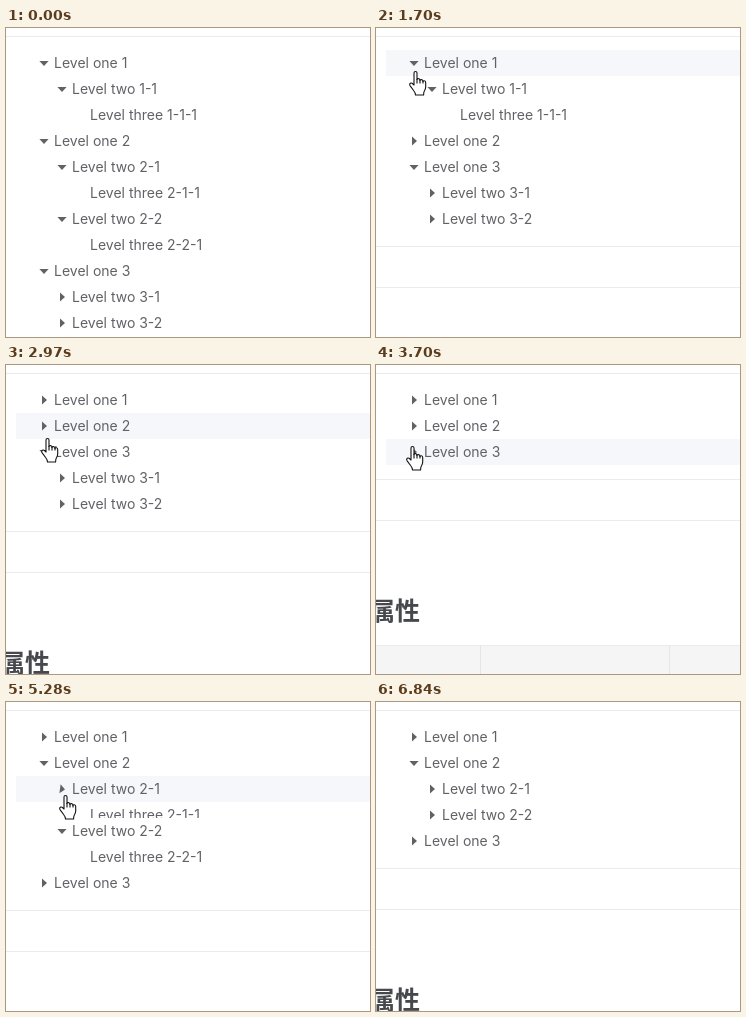
An HTML page for the animation above (7580 ms loop, 364 by 309 pixels).

```html
<!DOCTYPE html>
<html lang="en">
<head>
<meta charset="utf-8">
<title>Collapsible tree</title>
<style>
  html, body { margin: 0; width: 100%; height: 100%; overflow: hidden; background: #fff; }
  #stage { position: relative; width: 364px; height: 309px; overflow: hidden; border: 0; }
  .line { position: absolute; left: 0; width: 364px; height: 1px; background: #ebebeb; }
  #tree { position: absolute; left: 10px; top: 22px; width: 354px;
    font: 14px/26px Inter, sans-serif; color: #606266; white-space: nowrap; }
  .row { position: relative; height: 26px; }
  .row.hover { background: #f5f7fa; }
  .row svg { position: absolute; top: 7px; width: 12px; height: 12px; fill: #606266; }
  .row span { position: absolute; top: 0; }
  .group { overflow: hidden; }
  #below { position: absolute; left: 0; top: 0; width: 364px; height: 300px; }
  h2 { position: absolute; left: -6px; top: 126px; margin: 0; color: #47484d;
    font: bold 25px/36px "Noto Sans CJK SC", "Noto Sans CJK", sans-serif; white-space: nowrap; }
  #table { position: absolute; left: 0; top: 180px; width: 364px; height: 60px;
    background: #f5f5f5; border-top: 1px solid #ebebeb; box-sizing: border-box; }
  #table i { position: absolute; top: 0; width: 1px; height: 60px; background: #e6e6e6; }
  #hand { position: absolute; left: 0; top: 0; width: 18px; height: 25px; overflow: visible; }
</style>
</head>
<body>
<div id="stage">
  <div class="line" style="top:8px"></div>
  <div id="tree"></div>
  <div id="below">
    <div class="line" style="top:14px"></div>
    <div class="line" style="top:55px"></div>
    <h2>属性</h2>
    <div id="table"><i style="left:104px"></i><i style="left:293px"></i></div>
  </div>
  <svg id="hand" viewBox="0 0 18 25" fill="#fff" stroke="#111" stroke-width="1.1" stroke-linejoin="round">
    <path d="M5 2Q5 .5 6.5 .5Q8 .5 8 2V8.5Q8.2 7.5 9.4 7.5Q11 7.6 11 9.5Q11.2 8.5 12.4 8.5Q14 8.6 14 10.5Q14.2 9.6 15.3 9.7Q16.7 9.8 16.7 11.6V16Q16.6 18 15.5 19.7Q14.6 21 14.6 24H6.5Q6.3 21.5 4.6 19.5L1 14.6Q.1 13 1.3 12.2Q2.6 11.5 4 13L5 14Z"/>
    <path d="M8 8V12.5M11 9V12.5M14 10V12.5" fill="none"/>
  </svg>
</div>
<script>
const LOOP = 7580, ROW = 26, TOP = 22, FOLD = 300, LEAD = 120;
const ENTER = 130, LEAVE = 6840;

// toggles: times at which the node starts to close, open, ...
const node = (text, toggles, ...kids) => ({ text, toggles, kids });
const leaf = (text, closed) => ({ text, closed, kids: [] });
const roots = [
  node('Level one 1', [2080],
    node('Level two 1-1', [], leaf('Level three 1-1-1'))),
  node('Level one 2', [1130, 4200],
    node('Level two 2-1', [5154], leaf('Level three 2-1-1')),
    node('Level two 2-2', [5930], leaf('Level three 2-2-1'))),
  node('Level one 3', [3380],
    leaf('Level two 3-1', true), leaf('Level two 3-2', true))
];

// time, x, y of the fingertip
const path = [
  [130, 264, 290], [870, 37, 112], [1350, 37, 112], [1630, 40, 49],
  [1850, 40, 24], [2080, 39, 34], [2570, 39, 35], [2840, 46, 62],
  [3110, 37, 86], [3310, 37, 81], [3750, 37, 81], [4040, 45, 57],
  [4190, 46, 50], [4480, 46, 68], [4600, 46, 68], [4800, 59, 93],
  [5070, 60, 93], [5330, 60, 93], [5550, 59, 100], [5760, 59, 100],
  [5860, 57, 112], [5980, 57, 113], [6840, 305, 309]
];

const $ = id => document.getElementById(id);
const ease = p => { p = Math.min(1, Math.max(0, p)); return p * p * (3 - 2 * p); };

function add(parent, cls) {
  const el = document.createElement('div');
  el.className = cls;
  return parent.appendChild(el);
}

function build(nodes, parent, depth) {
  for (const n of nodes) {
    const x = depth * 18;
    n.row = add(parent, 'row');
    n.row.innerHTML = `<span style="left:${38 + x}px">${n.text}</span>`;
    if (n.toggles || n.closed) {
      n.row.insertAdjacentHTML('beforeend',
        `<svg viewBox="-6 -6 12 12" style="left:${22 + x}px"><path d="M-2-4.6L3 0L-2 4.6Z"/></svg>`);
      n.arrow = n.row.querySelector('path');
    }
    if (n.kids.length) {
      n.group = add(parent, 'group');
      build(n.kids, n.group, depth + 1);
    }
  }
}

// 1 = open, 0 = closed
function openness(toggles, t) {
  return toggles.reduce((v, start, i) => v + (i % 2 ? 1 : -1) * ease((t - start) / FOLD), 1);
}

function measure(nodes, t) {
  let sum = 0;
  for (const n of nodes) {
    n.size = 0;
    if (n.group) {
      n.size = openness(n.toggles, t) * measure(n.kids, t);
      n.group.style.height = n.size + 'px';
    }
    if (n.arrow) {
      const turn = n.closed ? 0 : 90 * openness(n.toggles, t + LEAD);
      n.arrow.setAttribute('transform', `rotate(${turn})`);
    }
    sum += ROW + n.size;
  }
  return sum;
}

function hover(nodes, y, end, tip) {
  for (const n of nodes) {
    n.row.classList.toggle('hover', tip >= y && tip < Math.min(y + ROW, end));
    y += ROW;
    hover(n.kids, y, Math.min(y + n.size, end), tip);
    y += n.size;
  }
}

function pointer(t) {
  let i = 1;
  while (i < path.length - 1 && path[i][0] < t) i++;
  const [t0, x0, y0] = path[i - 1], [t1, x1, y1] = path[i];
  const p = ease((t - t0) / (t1 - t0));
  return [x0 + (x1 - x0) * p, y0 + (y1 - y0) * p];
}

function draw() {
  const t = performance.now() % LOOP;
  const bottom = TOP + measure(roots, t);
  $('below').style.transform = `translateY(${Math.round(bottom)}px)`;
  const shown = t >= ENTER && t < LEAVE;
  const [x, y] = pointer(t);
  hover(roots, TOP, bottom, shown ? y : -1);
  $('hand').style.display = shown ? 'block' : 'none';
  $('hand').style.transform = `translate(${Math.round(x) - 7}px, ${Math.round(y)}px)`;
  requestAnimationFrame(draw);
}

build(roots, $('tree'), 0);
draw();
</script>
</body>
</html>
```
